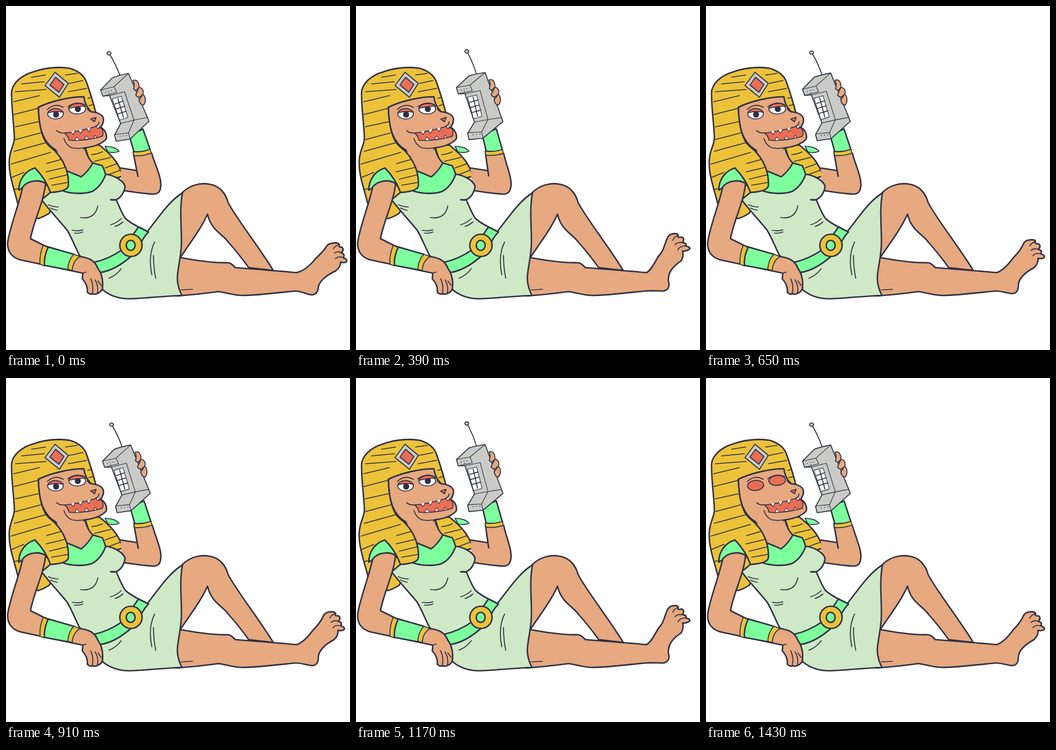
Write an HTML page that moves like this. It is 618 px wide and 618 px high and loops after 1560 ms.

```html
<!DOCTYPE html>
<html lang="en">
<head>
<meta charset="utf-8">
<title>Reclining on the phone</title>
<style>
  html, body { margin: 0; height: 100%; overflow: hidden; background: #fff; }
  svg { display: block; width: 100vw; height: 100vh; }
  path, circle, ellipse { stroke: #2e3044; stroke-width: 2.6; stroke-linejoin: round; stroke-linecap: round; fill: none; }
  .thin { stroke-width: 1.7; }
  .fine { stroke-width: 1.1; }
  .bare { stroke: none; }
  .skin { fill: #e6a980; }
  .gold { fill: #ecc23b; }
  .mint { fill: #7dff9d; }
  .dress { fill: #cfe8c6; }
  .grey { fill: #cacbc6; }
  .red { fill: #ea6e54; }
  .white { fill: #fff; }
  .ink { fill: #2e3044; }
</style>
</head>
<body>
<svg viewBox="0 0 618 618">
  <!-- back of headdress -->
  <path class="gold" d="M10 160C8 140 28 124 50 118C72 110 98 109 115 112C131 117 141 125 145 138C152 158 158 178 162 194L110 300L78 372Q68 379 57 382L22 358C12 320 4 300 6 275C8 255 16 248 15 235C14 210 10 185 10 160Z"/>
  <path class="mint thin" d="M178 252C190 252 200 256 203 261Q194 265 183 262Z"/>
  <path class="gold" d="M141 250L168 250C184 263 201 277 210 305Q198 311 180 311L152 284Z"/>
  <path class="thin" d="M154 267Q165 266 173 262M159 279L188 272M178 291L200 283M184 303L205 295"/>

  <!-- raised arm -->
  <path class="skin" d="M206 291L238 296L262 300L277 318C280 332 274 338 264 338Q238 336 208 331"/>
  <g id="forearm">
    <path class="skin bare" d="M229 264L262 262C267 283 280 308 278 324L252 330L237 306Z"/>
    <path d="M229 266L237 306M262 265C267 284 280 308 278 324"/>
    <path class="mint" d="M221 232L246 221L259 258Q246 263 230 262Z"/>
    <path class="gold thin" d="M228 262Q246 263 259 257L261 264Q247 270 230 269Z"/>
    <path class="thin" d="M205 126Q198 106 187 88"/>
    <ellipse class="grey thin" cx="185" cy="85" rx="3.6" ry="3"/>
    <path class="grey thin" d="M170 151L191 129Q204 124 220 121L257 207L223 239L198 243L195 232L206 211L186 161L174 162Z"/>
    <path class="fine" d="M170 151L194 145L220 121M194 145L199 155L174 162M186 161L213 154L230 205L220 228L195 231M220 228L223 239M206 211L230 205L254 200"/>
    <path class="white fine" d="M191 167L207 162L219 200L204 205Z"/>
    <path class="thin" d="M201 166L211 200M196 176L210 171M198 185L213 180M201 194L216 189"/>
    <path class="thin" d="M179 155h.1M184 153h.1M185 157h.1M189 152h.1M205 234h.1M211 233h.1M217 232h.1"/>
    <path class="skin thin" d="M228 134C234 131 239 136 239 146C245 147 248 152 246 159C252 163 251 174 247 178Q241 178 239 169Q243 164 245 159Q239 168 233 160Q236 153 239 146Q234 155 229 149Q232 141 228 134Z"/>
  </g>

  <!-- legs -->
  <path class="skin" d="M316 336C329 322 349 317 365 320C385 323 395 338 399 353C412 379 458 438 480 475L436 470C423 452 410 436 400 425C389 409 369 404 362 374C350 401 331 425 313 452"/>
  <path id="leg" class="skin"/>
  <path id="toes" class="thin"/>
  <path class="thin" d="M315 510L335 509"/>

  <!-- dress -->
  <path class="dress" d="M64 348C78 367 100 390 110 403C119 418 125 435 132 448L158 470L174 510C186 520 202 526 222 526C252 525 285 521 316 520C310 508 307 498 308 485C309 470 314 452 315 430C316 398 311 368 317 336C294 349 274 380 254 405L238 397Q221 388 214 381C205 367 202 356 198 348Q194 349 188 348L198 348Q211 342 214 324C210 312 193 304 178 302L110 310Z"/>
  <path class="thin" d="M134 380Q160 384 165 359M76 357Q85 361 94 361M80 363Q86 366 92 367M119 403Q131 405 138 402M123 408Q131 409 138 406M188 393Q199 390 207 382M196 396Q203 394 210 388M267 424C258 442 258 464 262 483M265 448Q265 470 269 489M185 489Q198 484 207 472"/>
  <path class="mint" d="M156 461C180 456 196 447 210 437L238 397L256 406Q244 418 239 436C217 459 192 476 168 479Z"/>
  <circle class="gold" cx="224.500" cy="430" r="20"/>
  <ellipse class="mint" cx="224" cy="430" rx="8" ry="9"/>

  <!-- neck and collar -->
  <path class="skin bare" d="M75 235L141 250Q146 274 157 283L136 308L106 305Z"/>
  <path d="M141 252Q146 274 157 283"/>
  <path class="mint" d="M106 295Q124 302 135 307Q148 297 156 282L173 287Q177 295 179 303C174 316 166 327 155 333C142 338 119 338 102 332Z"/>

  <!-- face -->
  <path class="skin" d="M58 182C80 171 115 163 140 163C141 174 147 184 153 190C164 191 173 195 175 202C176 210 172 215 170 218C179 223 182 232 180 239C171 249 157 253 141 255L112 275L80 252C62 235 59 210 58 182Z"/>
  <path class="skin bare" d="M80 235L139 255L130 290L105 288Z"/>
  <path class="thin" d="M91 224Q97 229 105 228M104 238Q108 251 119 255Q131 257 145 254M153 190Q148 189 146 184"/>
  <path class="red thin" d="M105 228C122 227 146 221 163 216Q166 220 171 219C175 224 175 230 173 234C158 239 132 243 113 241Q112 233 105 228Z"/>
  <path class="white fine" d="M116 226L121 231L124 224M130 223L134 229L138 221M145 220L149 226L153 218M162 215L165 221L168 216M124 241L127 235L132 241M141 239L145 233L148 238M158 237L160 232L163 236"/>
  <path class="red thin" d="M152 203L162 200L159 208Z"/>
  <path class="thin" d="M167 208Q167 214 161 216M74 186Q88 173 103 182M111 181Q126 170 141 177"/>
  <g id="open">
    <ellipse class="white thin" cx="89" cy="194" rx="14" ry="9"/>
    <ellipse class="white thin" cx="128" cy="185" rx="15" ry="9"/>
    <circle class="ink bare" cx="90" cy="195" r="5.500"/>
    <circle class="ink bare" cx="129" cy="185" r="5.500"/>
    <path class="red thin" d="M75 192C80 182 97 182 103 191Q89 188 75 192ZM113 184C117 173 137 173 143 180Q128 180 113 184Z"/>
  </g>
  <g id="shut">
    <ellipse class="red thin" cx="89" cy="193" rx="14.500" ry="9" transform="rotate(-5 89 193)"/>
    <ellipse class="red thin" cx="128" cy="184" rx="15" ry="9" transform="rotate(-5 128 184)"/>
  </g>

  <!-- near shoulder, front of headdress -->
  <path class="mint" d="M23 331C23 311 35 296 52 291Q70 302 75 322L35 323Z"/>
  <path class="gold" d="M58 182C59 212 64 240 78 252C92 262 101 275 107 290Q113 306 112 323C111 331 95 334 80 335C73 316 64 303 52 291"/>
  <path class="thin" d="M46 128L71 124M28 140L69 136M17 154L72 150M14 172L60 161M14 195L57 184M17 217L58 208M17 240L62 228M15 261L70 246M9 284L80 263M10 308L32 299M14 330L22 328M73 283L98 276M72 298L106 290M78 311L111 303M82 322L111 317M107 124L128 121M114 139L138 134M112 154L145 148M147 166L153 164M149 179L157 177"/>
  <path class="grey thin" d="M88 119L112 139L96 164L70 143Z"/>
  <path class="red thin" d="M89 128L104 141L95 155L79 142Z"/>

  <!-- near arm -->
  <path class="skin" d="M30 325C40 313 60 311 71 319C68 352 50 385 44 418L70 431L132 450C150 452 160 458 165 471C173 482 175 495 173 509Q169 515 165 516Q161 519 156 517Q150 519 146 514C147 506 144 498 137 490L138 480L30 457C12 454 2 442 3 425C6 399 24 355 30 325Z"/>
  <path class="thin" d="M152 490Q158 502 155 516M160 492Q167 504 164 516M165 494L171 502M138 480L144 478"/>
  <path class="gold thin" d="M67 430L76 434Q68 449 69 467L61 464Q60 446 67 430Z"/>
  <path class="mint" d="M76 433L122 446Q112 459 112 474L69 466Q68 449 76 433Z"/>
  <path class="gold thin" d="M122 446L133 450Q120 458 119 475L111 473Q112 456 122 446Z"/>
</svg>
<script>
const $ = id => document.getElementById(id);
const STEP = 130;

const shinTop = 'M308 451C340 457 370 462 396 461C404 461 407 465 412 470C450 473 490 476 522 479';
const shinBottom = 'C490 515 450 520 425 520C410 520 395 515 382 513C360 516 335 519 306 521';

// resting and flexed outlines, from the instep round to the heel
const foot = [
  'C535 476 548 464 556 454C564 446 571 440 575 433Q578 428 582 427Q596 423 599 429Q597 434 603 433Q609 438 602 443Q610 446 606 452Q615 456 611 460Q606 462 601 460Q602 468 592 476C575 484 562 495 561 506C560 514 556 519 549 519C540 518 530 512 520 512',
  'C531 474 537 460 543 450C551 442 553 434 556 425Q560 412 566 410Q578 407 579 412Q576 417 585 415Q592 418 586 425Q596 426 592 431Q602 433 599 437Q594 441 587 440Q589 450 584 458C566 470 561 480 561 494C565 504 560 511 552 512C542 512 530 511 520 512'
];
const toes = [
  'M599 429Q592 430 588 436M602 443Q594 440 590 444M606 452Q596 449 592 454',
  'M579 412Q572 414 569 421M586 425Q576 424 573 429M592 431Q582 431 578 438'
];

function blend([a, b], k) {
  const ends = b.match(/\d+/g);
  let i = 0;
  return a.replace(/\d+/g, n => +n + (ends[i++] - n) * k);
}

function draw(now) {
  const step = Math.floor(now / STEP) % 12;
  const pose = 3 - Math.abs(3 - step % 6);
  const blink = step === 11;
  $('forearm').setAttribute('transform', `rotate(${pose * 1.1} 252 328)`);
  $('leg').setAttribute('d', shinTop + blend(foot, pose / 3) + shinBottom);
  $('toes').setAttribute('d', blend(toes, pose / 3));
  $('open').style.display = blink ? 'none' : '';
  $('shut').style.display = blink ? '' : 'none';
}

let start;
function tick(now) {
  start ??= now;
  draw(now - start);
  requestAnimationFrame(tick);
}
draw(0);
requestAnimationFrame(tick);
</script>
</body>
</html>
```
